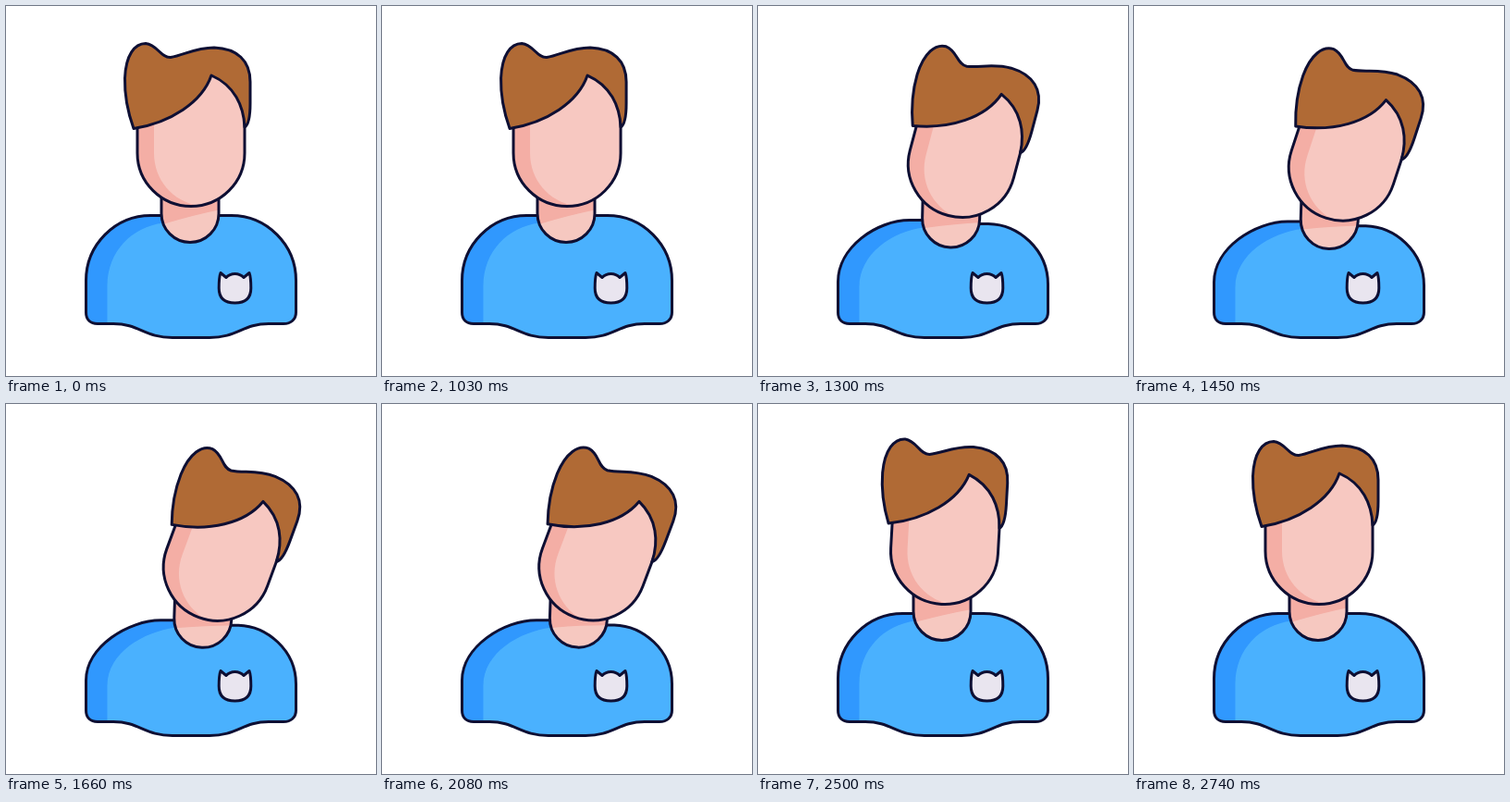
An HTML page for the animation above (2.77 s loop, 400 px wide and 400 px high).

```html
<!DOCTYPE html>
<html lang="en">
<head>
<meta charset="utf-8">
<title>Tilting head</title>
<style>
  html, body { margin: 0; width: 100%; height: 100%; overflow: hidden; background: #fff; }
  svg { display: block; width: 100%; height: 100%; }
  .line { fill: none; stroke: #0e0f33; stroke-width: 3; stroke-linejoin: round; stroke-linecap: round; }
</style>
</head>
<body>
<svg viewBox="0 0 400 400">
  <defs>
    <clipPath id="bodyClip"><path class="bodyShape"/></clipPath>
    <path id="neckShape" d="M168 195V224.500A31 31 0 0 0 230 224.500V195Z"/>
    <clipPath id="neckClip"><use href="#neckShape"/></clipPath>
    <path id="faceShape" d="M142 122V159A58 57.500 0 0 0 258 159V122Q256 84 222 70Z"/>
    <path id="hairShape" d="M138 132.500C131 113 128 97 128.500 78C129.500 53 139 40.500 151 40.500C164 42 167 56 178 55.500C192 53.500 204 45 225 45C250 46 264 59 264 82V105C264 115 263 128 258 131C257 108 247 86 222 75C212 104 178 126 138 132.500Z"/>
    <path id="badge" d="M232 288.500L238 293.500C243 288 252 288 257 293.500L263 288.500Q264.800 293 264.800 305C264.800 316 259 321 247.500 321C236 321 230.200 316 230.200 305Q230.200 293 232 288.500Z"/>
  </defs>

  <path class="bodyShape" fill="#4ab1fe"/>
  <path id="bodyShade" fill="#3098fe" clip-path="url(#bodyClip)"/>
  <path class="bodyShape line"/>
  <use href="#badge" fill="#e9e5ef"/>
  <use href="#badge" class="line"/>

  <g id="neck">
    <use href="#neckShape" fill="#f6c8c0"/>
    <g clip-path="url(#neckClip)">
      <path id="neckShade" fill="#f4aea5" d="M140 180H260V214L230 220.500Q203 226 173 235L140 246Z"/>
    </g>
    <use href="#neckShape" class="line"/>
  </g>

  <g id="head">
    <use href="#faceShape" fill="#f7c8c1"/>
    <path fill="#f4aea5" d="M142 120V159A58 57.500 0 0 0 200 216.500L208 216C180 211 160 188 160 159V120Z"/>
    <use href="#faceShape" class="line"/>
    <use href="#hairShape" fill="#b06a35"/>
    <use href="#hairShape" class="line"/>
  </g>
</svg>
<script>
const LOOP = 2770, START = 1030, STEP = 30;
const $ = id => document.getElementById(id);
const bodyPaths = document.querySelectorAll('.bodyShape');

// Cubic easing with end slopes of zero, handles at x1 and x2.
function ease(time, from, to, x1, x2) {
  const x = Math.min(1, Math.max(0, (time - from) / (to - from)));
  let low = 0, high = 1;
  for (let i = 0; i < 24; i++) {
    const s = (low + high) / 2, r = 1 - s;
    if (3 * s * r * r * x1 + 3 * s * s * r * x2 + s * s * s < x) low = s;
    else high = s;
  }
  return low * low * (3 - 2 * low);
}

// The shoulders follow the neck: the right one sinks further than the left.
function bodyPath(lean) {
  const x = 13.5 * lean, left = 226.5 + 7.5 * lean, right = 226.5 + 13 * lean;
  return `M86.5 ${297 + 2 * lean}
    C86.5 ${258 + 4 * lean} ${118 + 15 * lean} ${left} ${156.5 + 11 * lean} ${left}
    H${168 + x}L${230 + x} ${right}H${243.5 + 8 * lean}
    C282 ${right + lean} 313.5 ${258 + 8 * lean} 313.5 ${297 + 6 * lean}
    V331C313.5 339 308 343.5 300 343.5H284C256 343.5 250 358.5 220 358.5H180
    C150 358.5 144 343.5 116 343.5H99C91 343.5 86.5 339 86.5 331Z`;
}

function shadePath(lean) {
  const x = 13 * lean, y = 7.5 * lean;
  return `M80 350H109.5V${302 + 2 * lean}
    C110 ${265 + 4 * lean} ${136 + x} ${239 + y} ${170 + x} ${234.5 + y}V215H80Z`;
}

function draw(elapsed) {
  const loopTime = elapsed % LOOP;
  const time = loopTime < START ? 0 : START + Math.floor((loopTime - START) / STEP) * STEP;
  const lean = ease(time, 1020, 1830, .22, .1) - ease(time, 2010, 2510, .4, .4);
  const tilt = ease(time, 1020, 1830, .17, .06) - ease(time, 2110, 2740, .5, .3);
  const lag = tilt - lean;

  const body = bodyPath(lean);
  bodyPaths.forEach(path => path.setAttribute('d', body));
  $('bodyShade').setAttribute('d', shadePath(lean));
  $('neck').setAttribute('transform',
    `translate(${13.2 * lean} ${8 * lean}) rotate(${2 * lean} 199 250)`);
  $('neckShade').setAttribute('transform', `rotate(${10 * tilt} 173 235)`);
  $('head').setAttribute('transform',
    `translate(${14.5 * lean - 6 * lag} ${8.6 * lean - 7.5 * lag}) rotate(${20.6 * tilt} 181 203)`);
}

const origin = performance.now();
function tick() {
  draw(performance.now() - origin);
  requestAnimationFrame(tick);
}
tick();
</script>
</body>
</html>
```
